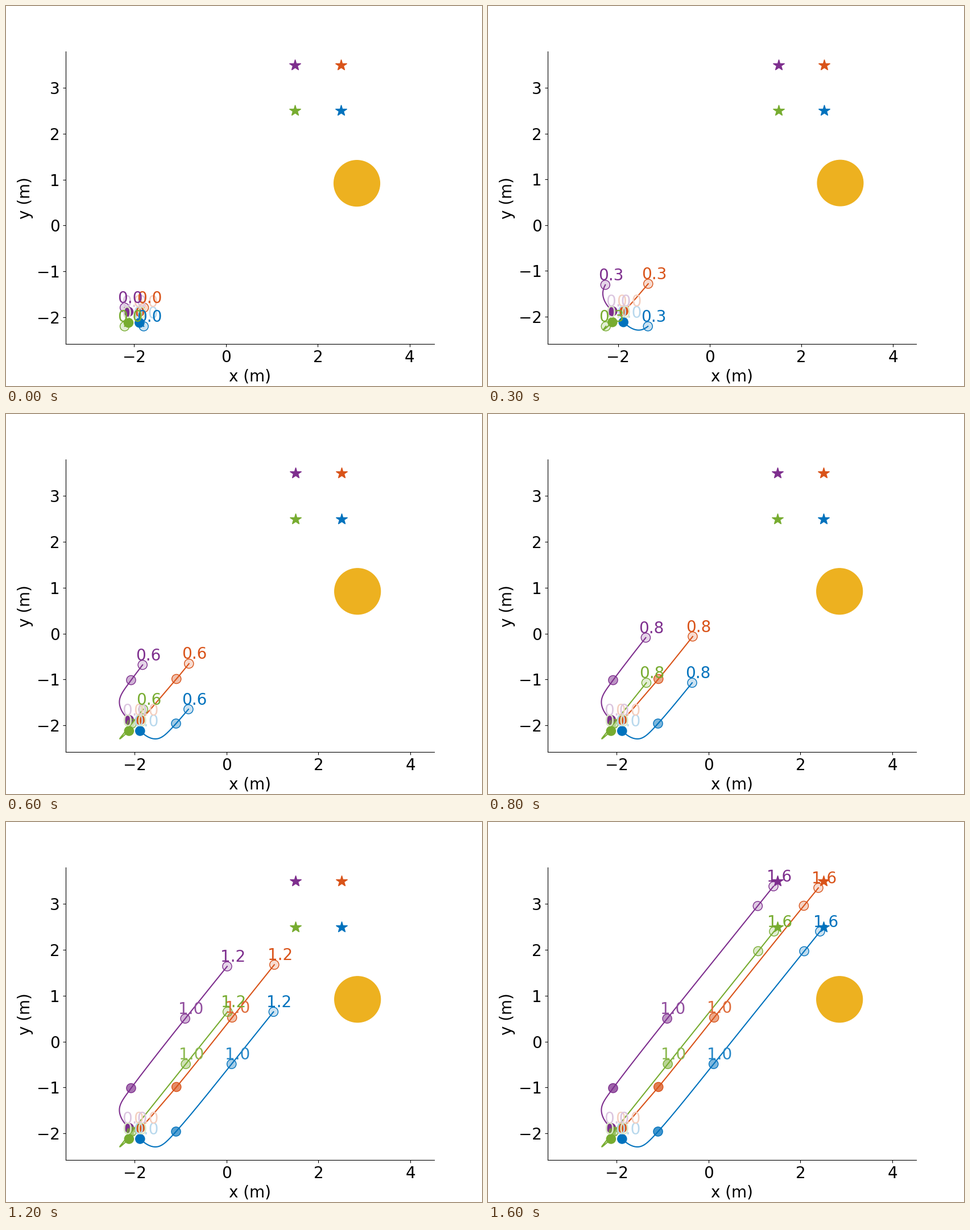
Animation, 837 px wide and 669 px high, one loop 2600 ms. Source, as a matplotlib script:

```python
import numpy as np
import matplotlib.pyplot as plt
from matplotlib.animation import FuncAnimation
from matplotlib.colors import to_rgb
from matplotlib.patches import Circle

WIDTH, HEIGHT, DPI = 837, 669, 100
FRAMES, INTERVAL, LAST_STEP = 26, 100, 16
RADIUS = 0.1
OBSTACLE, OBSTACLE_RADIUS = (2.85, 0.92), 0.5
START = -0.06
# time of each marker left on the path, with its label and label strength
MARKS = [(START, "0.0", 0.28), (0.46, None, 0), (0.962, "1.0", 0.85), (1.483, None, 0)]

KNOTS = np.array([START, 0, 0.2, 0.4, 0.8, 1.0, 1.4, 1.6])
ROBOTS = [
    ("#0072BD", (2.5, 2.5),
     [-1.88, -1.790, -1.487, -1.198, -0.356, 0.238, 1.809, 2.427],
     [-2.12, -2.197, -2.286, -2.068, -1.071, -0.329, 1.628, 2.399]),
    ("#D95319", (2.5, 3.5),
     [-1.88, -1.785, -1.481, -1.190, -0.344, 0.250, 1.816, 2.390],
     [-1.88, -1.790, -1.445, -1.108, -0.063, 0.685, 2.640, 3.348]),
    ("#7E2F8E", (1.5, 3.5),
     [-2.12, -2.205, -2.329, -2.163, -1.365, -0.771, 0.800, 1.413],
     [-1.88, -1.790, -1.463, -1.133, -0.088, 0.661, 2.615, 3.382]),
    ("#77AC30", (1.5, 2.5),
     [-2.12, -2.205, -2.319, -2.150, -1.352, -0.758, 0.807, 1.425],
     [-2.12, -2.197, -2.284, -2.070, -1.071, -0.329, 1.630, 2.399]),
]


def natural_spline(knots, values):
    """Return a function that evaluates the natural cubic spline."""
    values = np.asarray(values, float)
    h = np.diff(knots)
    slopes = np.diff(values) / h
    n = len(knots)
    system, rhs = np.eye(n), np.zeros(n)
    for i in range(1, n - 1):
        system[i, i - 1:i + 2] = h[i - 1], 2 * (h[i - 1] + h[i]), h[i]
        rhs[i] = 6 * (slopes[i] - slopes[i - 1])
    bend = np.linalg.solve(system, rhs)

    def evaluate(t):
        i = np.clip(np.searchsorted(knots, t) - 1, 0, n - 2)
        b = (t - knots[i]) / h[i]
        a = 1 - b
        curve = (a**3 - a) * bend[i] + (b**3 - b) * bend[i + 1]
        return a * values[i] + b * values[i + 1] + curve * h[i]**2 / 6

    return evaluate


PATHS = [(color, goal, natural_spline(KNOTS, xs), natural_spline(KNOTS, ys))
         for color, goal, xs, ys in ROBOTS]


def tint(color, strength):
    return tuple(1 - strength * (1 - c) for c in to_rgb(color))


plt.rcParams.update({"font.family": "DejaVu Sans", "font.size": 20})
# the small excess keeps the pixel size from being rounded down
fig, ax = plt.subplots(figsize=((WIDTH + 0.01) / DPI, (HEIGHT + 0.01) / DPI), dpi=DPI)


def set_limits(points):
    """Fit the height with a 5% margin and keep both axes at one scale."""
    low, high = np.min(points, axis=0), np.max(points, axis=0)
    center, half = (low + high) / 2, (high - low) * 0.55
    box = ax.get_position()
    half_x = half[1] * (box.width * WIDTH) / (box.height * HEIGHT)
    ax.set_xlim(center[0] - half_x, center[0] + half_x)
    ax.set_ylim(center[1] - half[1], center[1] + half[1])


def add_label(x, y, text, color):
    ax.text(x - 0.15, y + 0.1, text, color=color)


def draw(frame):
    step = min(frame, LAST_STEP)
    now = step / 10
    ax.cla()
    ax.spines[["top", "right"]].set_visible(False)
    ax.set_xticks(range(-2, 5, 2))
    ax.set_yticks(range(-2, 4))
    ax.set_xlabel("x (m)")
    ax.set_ylabel("y (m)")

    ax.add_patch(Circle(OBSTACLE, OBSTACLE_RADIUS, color="#EDB120"))
    points = [np.add(OBSTACLE, s * OBSTACLE_RADIUS) for s in (-1, 1)]
    times = np.linspace(START, now, 160)
    marks = [m for m in MARKS if m[0] < now] + [(now, f"{now:.1f}", 1)]

    for color, goal, path_x, path_y in PATHS:
        xs, ys = path_x(times), path_y(times)
        ax.plot(xs, ys, color=color, lw=1.5)
        ax.plot(*goal, "*", color=color, ms=15)
        points += [goal, *zip(xs, ys)]
        for t, _, _ in marks:
            x, y = path_x(t), path_y(t)
            alpha = 1 - 0.8 * (t - START) / (now - START)
            ax.add_patch(Circle((x, y), RADIUS, fc=(*to_rgb(color), alpha),
                                ec=color, lw=1))
            points += [(x - RADIUS, y - RADIUS), (x + RADIUS, y + RADIUS)]

    for t, text, strength in marks:
        if text:
            for color, _, path_x, path_y in PATHS:
                add_label(path_x(t), path_y(t), text, tint(color, strength))
    set_limits(points)
    return []


anim = FuncAnimation(fig, draw, frames=FRAMES, interval=INTERVAL,
                     init_func=lambda: draw(0), repeat=True, repeat_delay=0)
plt.show()
```
